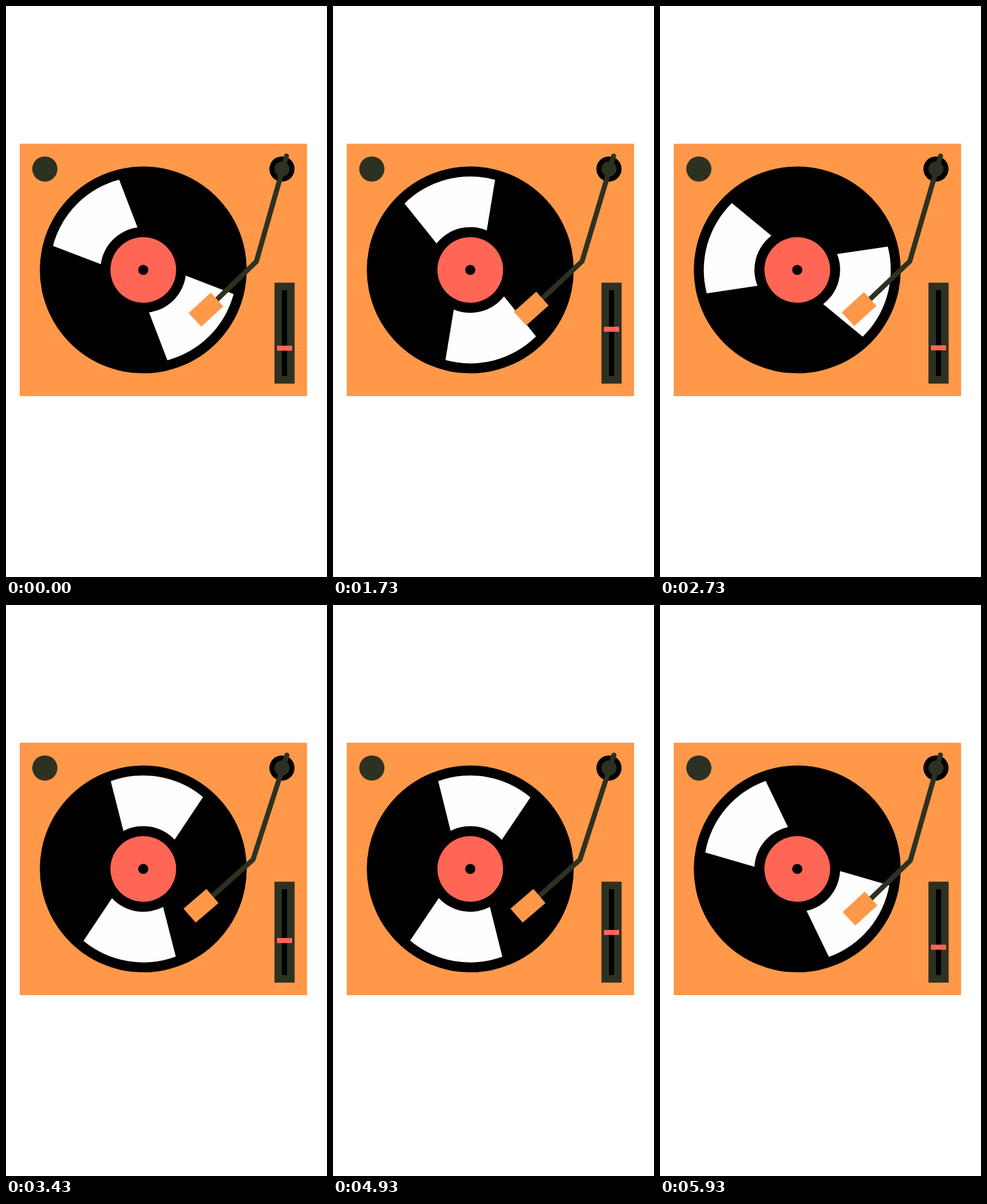
An HTML page that plays this animation: 561 px wide and 998 px high, repeating every 6010 ms.

```html
<!DOCTYPE html>
<html lang="en">
<head>
<meta charset="utf-8">
<title>Turntable</title>
<style>
  html, body { margin: 0; width: 100%; height: 100%; overflow: hidden; background: #fff; }
  svg { display: block; width: 100%; height: 100%; }
  .wood { fill: #ff9849; }
  .dark { fill: #2d3122; }
  .red { fill: #ff6655; }
  .shine { fill: #fefefe; }
</style>
</head>
<body>
<svg viewBox="0 0 561 998">
  <rect class="wood" x="24" y="240.7" width="502.2" height="441.2"/>
  <circle class="dark" cx="67.9" cy="284.9" r="22"/>
  <g transform="translate(239.9 461.3)">
    <circle r="180.8"/>
    <g id="record">
      <path class="shine"/>
      <path class="shine" transform="rotate(180)"/>
    </g>
    <circle class="red" r="57.4"/>
    <circle r="8.8"/>
  </g>
  <rect class="dark" x="469.2" y="483.6" width="35.2" height="176.4"/>
  <rect x="482.3" y="496.8" width="8.9" height="150"/>
  <rect id="handle" class="red" x="473.5" y="593.7" width="26.5" height="8.8"/>
  <g transform="translate(482.3 284.9)">
    <circle r="22"/>
    <circle class="dark" r="13.2"/>
    <g id="arm">
      <path d="M7.8-22.7L-44.8 161.8L-113 227.6" fill="none" stroke="#2d3122"
        stroke-width="8.8" stroke-linecap="round" stroke-linejoin="round"/>
      <path class="wood" d="M-124.3 216L-102.4 240L-141 275.3L-163.2 251.8Z"/>
    </g>
  </g>
</svg>
<script>
const LOOP = 6010, STEPS = 120;
const byId = id => document.getElementById(id);
const record = byId('record'), arm = byId('arm'), handle = byId('handle');

// Reflection: a ring slice whose straight edges pass beside the centre.
function slicePath(inner, outer, halfAngle, offset) {
  const point = (r, side) => {
    const a = side * (halfAngle * Math.PI / 180 + Math.asin(offset / r));
    return `${r * Math.sin(a)} ${-r * Math.cos(a)}`;
  };
  return `M${point(outer, -1)}A${outer} ${outer} 0 0 1 ${point(outer, 1)}` +
    `L${point(inner, 1)}A${inner} ${inner} 0 0 0 ${point(inner, -1)}Z`;
}
for (const path of record.children) path.setAttribute('d', slicePath(74.9, 163.4, 24, 17.2));

// Ease-in-out, cubic-bezier(.42, 0, .58, 1).
function ease(x) {
  if (x <= 0) return 0;
  if (x >= 1) return 1;
  let low = 0, high = 1, u = 0.5;
  for (let i = 0; i < 20; i++) {
    u = (low + high) / 2;
    const bx = 3 * u * (1 - u) * (0.42 * (1 - u) + 0.58 * u) + u ** 3;
    if (bx < x) low = u; else high = u;
  }
  return u * u * (3 - 2 * u);
}

// Rises from 0 to 1 until `top`, then falls from `fall` until `end`.
const swell = (t, top, fall, end) => ease(t / top) - ease((t - fall) / (end - fall));

function draw(ms) {
  // Steps alternate between 30 and 70 ms.
  const step = Math.min(STEPS - 1, 2 * Math.floor(ms / 100) + (ms % 100 >= 30 ? 1 : 0));
  const t = step * LOOP / STEPS / 1000;
  record.setAttribute('transform', `rotate(${-45 + 120 * t})`);
  arm.setAttribute('transform', `rotate(${2.75 * swell(t % 1.5, 0.7, 0.7, 1.45)})`);
  handle.setAttribute('transform', `translate(0 ${-40 * swell(t % 3, 1.22, 1.29, 2.9)})`);
}

const start = performance.now();
function tick() {
  draw((performance.now() - start) % LOOP);
  requestAnimationFrame(tick);
}
tick();
</script>
</body>
</html>
```
